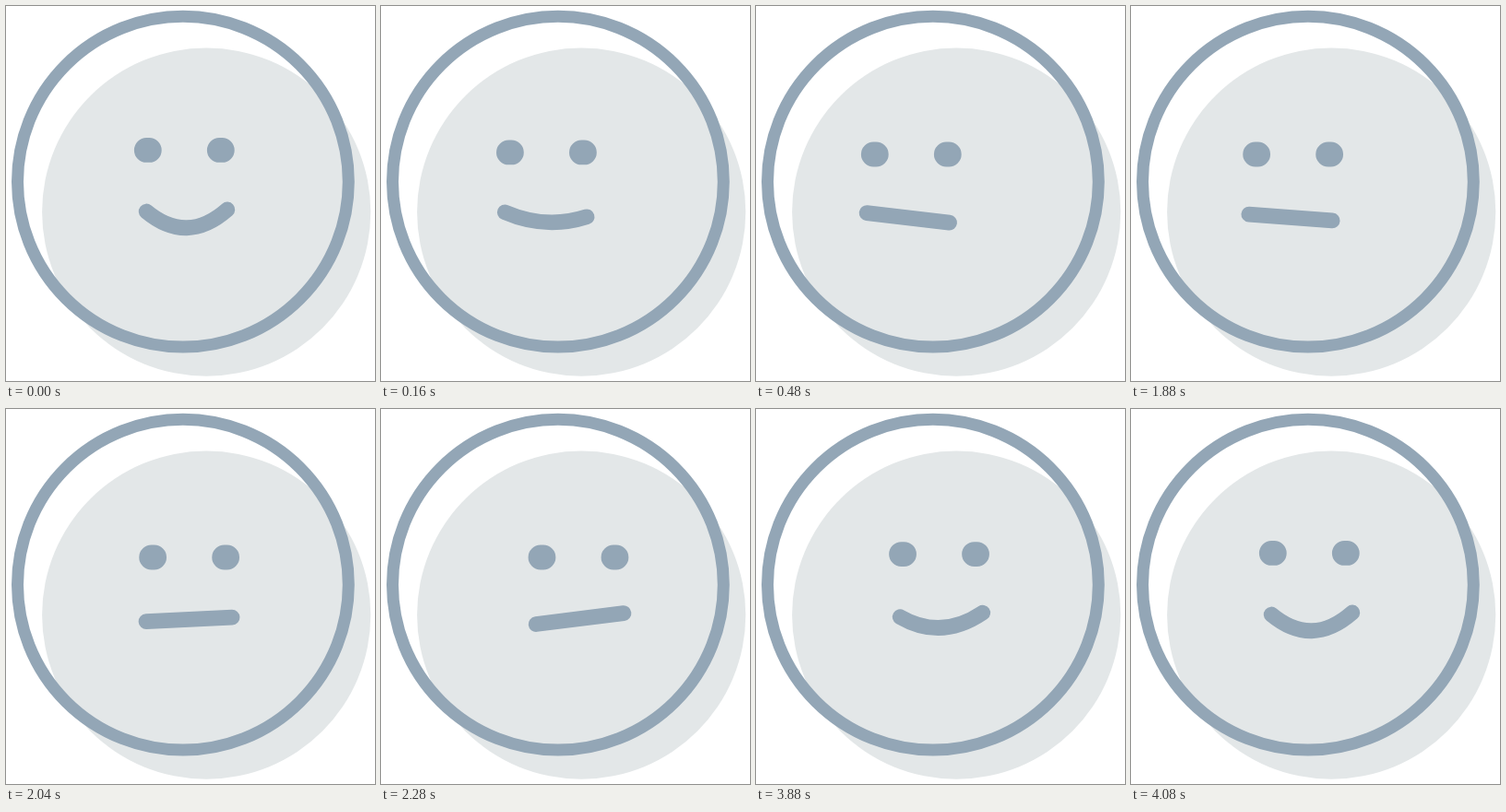
An HTML page for the animation above (6.08 s loop, 400 by 407 pixels).

```html
<!DOCTYPE html>
<html lang="en">
<head>
<meta charset="utf-8">
<title>Looking around</title>
<style>
  html, body { margin: 0; width: 100%; height: 100%; overflow: hidden; background: #fff; }
  svg { display: block; width: 100%; height: 100%; }
</style>
</head>
<body>
<svg viewBox="0 0 400 407">
  <circle cx="217.2" cy="223.6" r="178.1" fill="#e3e7e8"/>
  <circle cx="191.9" cy="190.7" r="179.4" fill="none" stroke="#93a6b6" stroke-width="13"/>
  <g fill="none" stroke="#93a6b6" stroke-linecap="round">
    <path id="eyes" stroke-width="26.8"/>
    <path id="mouth" stroke-width="16.8"/>
  </g>
</svg>
<script>
const LOOP = 6080, STEP = 40;
const eyes = document.getElementById('eyes');
const mouth = document.getElementById('mouth');

// look: sideways shift of the eyes, tilt: drop of the mouth's right end, smile: 0 to 1
const happy = { look: 0, tilt: -1, smile: 1 };
const left = { look: -25, tilt: 5.25, smile: 0 };
const right = { look: 21, tilt: -6, smile: 0 };

const easeOut = u => 1 - (1 - Math.min(1, u)) ** 2;

function blend(from, to, u) {
  const mix = key => from[key] + (to[key] - from[key]) * easeOut(u);
  return { look: mix('look'), tilt: mix('tilt'), smile: mix('smile') };
}

function poseAt(t) {
  if (t < 1840) return blend(happy, left, t / 480);
  // The glance to the right rests one step short of its end
  if (t < 3680) return blend(left, right, Math.min(t - 1840, 440) / 480);
  return blend(right, happy, (t - 3680) / 400);
}

function drawFace({ look, tilt, smile }) {
  const eyeX = 152.3 + look, eyeY = 161 - 4.6 * smile;
  eyes.setAttribute('d', `M${eyeX} ${eyeY}h3m76 0h3`);

  // The mouth follows the eyes, widens with the tilt and lifts with the smile
  const x = 192.6 + 1.11 * look + 3.4 * smile;
  const y = 228.8 + 0.2 * tilt - 6.6 * smile;
  const half = 46 - 0.24 * tilt - 2.4 * smile;
  mouth.setAttribute('d',
    `M${x - half} ${y - tilt}Q${x} ${y + 37.5 * smile} ${x + half} ${y + tilt}`);
}

const start = performance.now();
function tick() {
  const t = (performance.now() - start) % LOOP;
  drawFace(poseAt(Math.floor(t / STEP) * STEP));
  requestAnimationFrame(tick);
}
tick();
</script>
</body>
</html>
```
